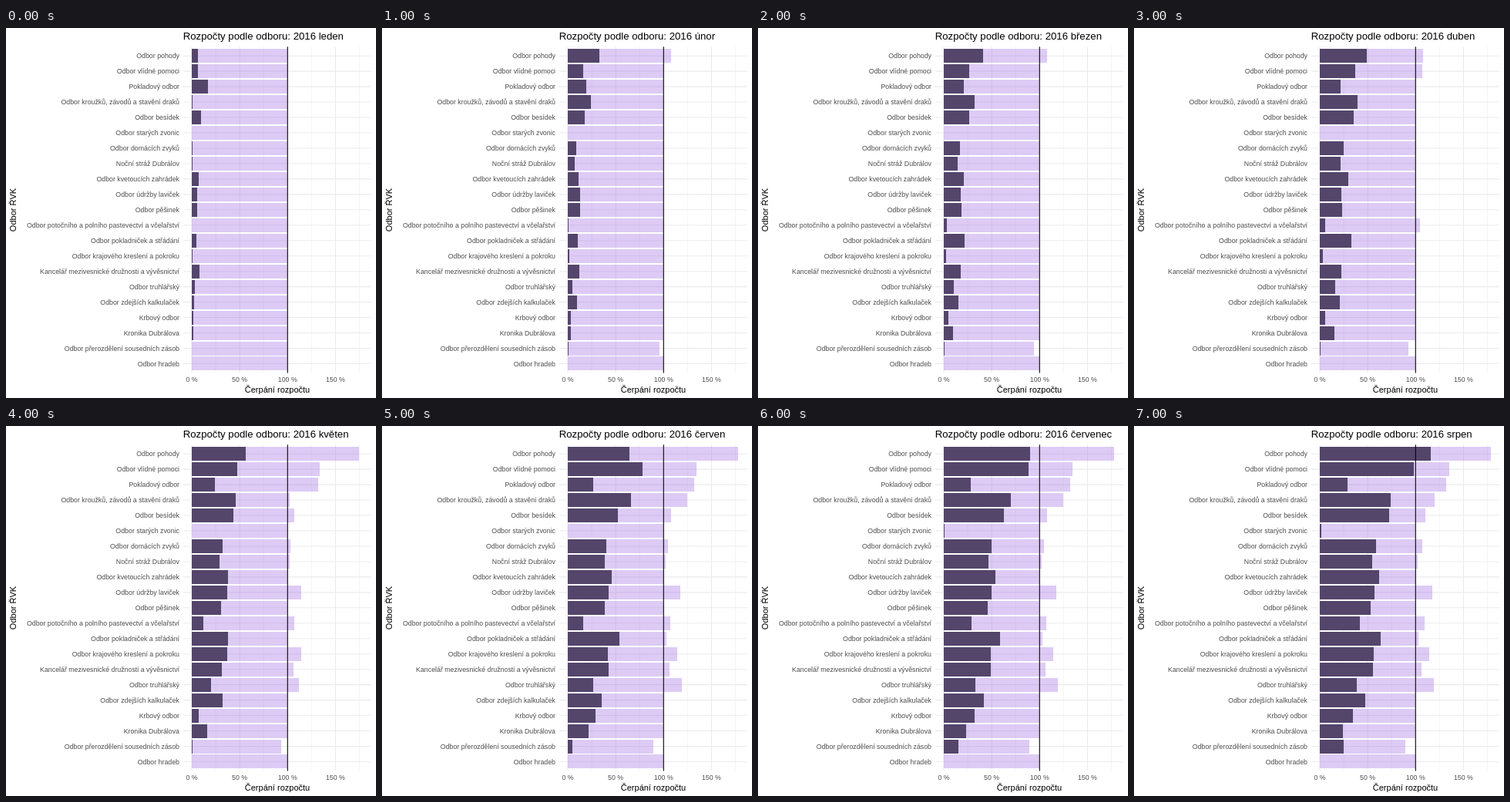
Recreate the animation shown at these times as an HTML page. Size 480 by 480 pixels, loop 8 s.

```html
<!DOCTYPE html>
<html lang="cs">
<head>
<meta charset="utf-8">
<title>Rozpočty podle odboru</title>
<style>
  html, body { margin: 0; width: 100%; height: 100%; overflow: hidden; background: #fff; }
  svg { display: block; width: 100vw; height: 100vh; }
  text { font: 8.8px "Liberation Sans", Arial, sans-serif; fill: #4d4d4d; }
  .title { font-size: 13.2px; fill: #000; }
  .axis { font-size: 11px; fill: #000; }
  .grid { stroke: #ebebeb; stroke-width: 1.07; }
  .minor { stroke-width: .53; }
  .limit, .spent { shape-rendering: crispEdges; }
  .limit { fill: rgb(142, 85, 222); fill-opacity: .3; }
  .spent { fill: #54456b; }
  .full { stroke: #000; stroke-width: 1.07; }
</style>
</head>
<body>
<svg id="chart" viewBox="0 0 480 480"></svg>
<script>
const MONTHS = ['leden', 'únor', 'březen', 'duben', 'květen', 'červen', 'červenec', 'srpen'];
const MONTH_MS = 1000;
const LEFT = 230, RIGHT = 474, TOP = 24.2, BOTTOM = 447.4;
const ZERO = 241, PERCENT = 1.243, ROW = 19.965, BAR = 18;

const chart = document.getElementById('chart');
const depts = [];

function add(tag, attrs, text) {
  const el = document.createElementNS('http://www.w3.org/2000/svg', tag);
  for (const key in attrs) el.setAttribute(key, attrs[key]);
  if (text) el.textContent = text;
  return chart.appendChild(el);
}
const line = (cls, x1, y1, x2, y2) => add('line', { class: cls, x1, y1, x2, y2 });
const xOf = percent => ZERO + percent * PERCENT;
const yOf = row => TOP + (row + .6) * ROW;

// Bar lengths in px. March and July lie halfway between their neighbours;
// a limit keeps its value until the next listed month.
function dept(name, [jan, feb, apr, may, jun, aug], limits = {}) {
  const spent = [jan, feb, (feb + apr) / 2, apr, may, jun, (jun + aug) / 2, aug];
  let width = 124;
  const limit = MONTHS.map((_, m) => width = limits[m] ?? width);
  depts.push({ name, spent, limit });
}

dept('Odbor pohody', [8, 41, 61, 70, 80, 144], { 1: 134, 4: 217, 5: 221, 7: 222 });
dept('Odbor vlídné pomoci', [8, 20, 46, 59, 97, 122], { 0: 125, 3: 133, 4: 166, 5: 167, 7: 168 });
dept('Pokladový odbor', [21, 24, 27, 30, 33, 36], { 4: 164 });
dept('Odbor kroužků, závodů a stavění draků', [1, 30, 49, 57, 82, 92], { 4: 127, 5: 155, 7: 149 });
dept('Odbor besídek', [12, 22, 44, 54, 65, 90], { 4: 133, 5: 134, 7: 137 });
dept('Odbor starých zvonic', [0, 0, 0, 0, 0, 2]);
dept('Odbor domácích zvyků', [1, 11, 31, 40, 50, 73], { 1: 125, 4: 128, 5: 130, 7: 133 });
dept('Noční stráž Dubrálov', [1, 9, 27, 36, 48, 68], { 4: 127 });
dept('Odbor kvetoucích zahrádek', [9, 14, 37, 47, 57, 77], { 4: 125 });
dept('Odbor údržby laviček', [7, 16, 28, 46, 53, 71], { 4: 142, 5: 146 });
dept('Odbor pěšinek', [7, 16, 29, 38, 48, 66], { 7: 125 });
dept('Odbor potočního a polního pastevectví a včelařství', [0, 1, 7, 15, 20, 52], { 3: 130, 4: 133, 7: 136 });
dept('Odbor pokladniček a střádání', [6, 13, 41, 47, 67, 79], { 5: 128 });
dept('Odbor krajového kreslení a pokroku', [1, 2, 4, 46, 52, 70], { 4: 142 });
dept('Kancelář mezivesnické družnosti a vývěsnictví', [10, 15, 28, 39, 53, 69], { 4: 132 });
dept('Odbor truhlářský', [4, 6, 20, 25, 33, 48], { 4: 139, 5: 148 });
dept('Odbor zdejších kalkulaček', [3, 12, 26, 40, 44, 59]);
dept('Krbový odbor', [2, 4, 7, 9, 36, 43]);
dept('Kronika Dubrálova', [2, 4, 19, 20, 27, 30]);
dept('Odbor přerozdělení sousedních zásob', [0, .6, 1, 1, 6, 31], { 1: 119, 2: 117, 3: 115, 4: 116, 5: 111 });
dept('Odbor hradeb', [0, 0, 0, 0, 0, 0]);

for (let p = 25; p <= 175; p += 50) line('grid minor', xOf(p), TOP, xOf(p), BOTTOM);
depts.forEach((_, i) => line('grid', LEFT, yOf(i), RIGHT, yOf(i)));
for (let p = 0; p <= 150; p += 50) {
  line('grid', xOf(p), TOP, xOf(p), BOTTOM);
  add('text', { x: xOf(p), y: 459, 'text-anchor': 'middle' }, p + ' %');
}

depts.forEach((d, i) => {
  const y = Math.round(yOf(i) - BAR / 2);
  const bar = cls => add('rect', { class: cls, x: ZERO, y, height: BAR });
  d.limitBar = bar('limit');
  d.spentBar = bar('spent');
  add('text', { x: 225, y: yOf(i) + 3.15, 'text-anchor': 'end' }, d.name);
});
line('full', xOf(100), TOP, xOf(100), BOTTOM);

const title = add('text', { class: 'title', x: 229.7, y: 15 });
add('text', { class: 'axis', x: 352, y: 473, 'text-anchor': 'middle' }, 'Čerpání rozpočtu');
add('text', { class: 'axis', transform: 'translate(13 236) rotate(-90)', 'text-anchor': 'middle' }, 'Odbor ŘVK');

let shown = -1;
function show(month) {
  shown = month;
  title.textContent = 'Rozpočty podle odboru: 2016 ' + MONTHS[month];
  for (const d of depts) {
    d.limitBar.setAttribute('width', d.limit[month]);
    d.spentBar.setAttribute('width', d.spent[month]);
  }
}

let start;
function tick(now) {
  start ??= now;
  const month = Math.floor((now - start) / MONTH_MS) % MONTHS.length;
  if (month !== shown) show(month);
  requestAnimationFrame(tick);
}
show(0);
requestAnimationFrame(tick);
</script>
</body>
</html>
```
